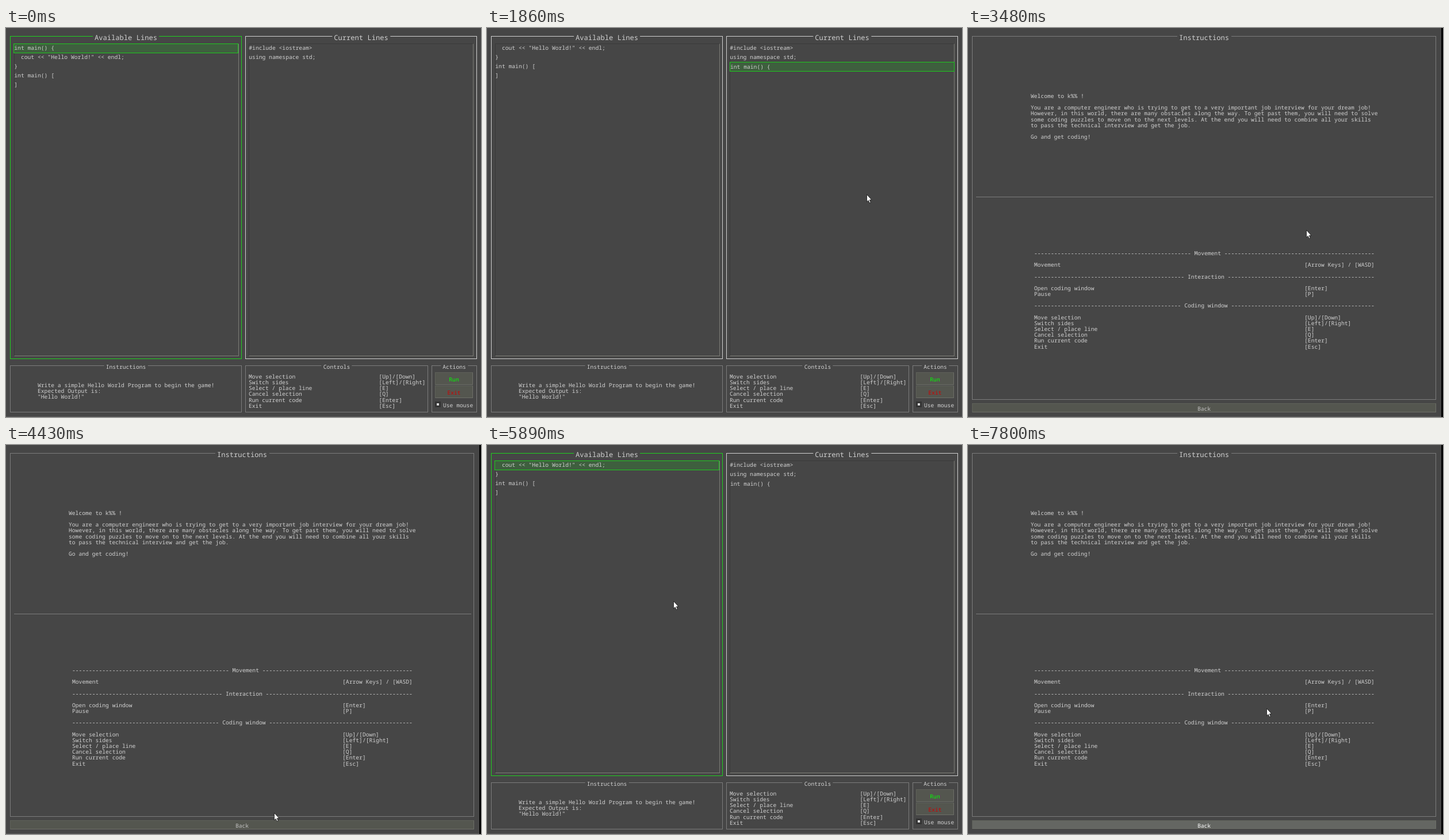
Recreate the animation shown at these times as an HTML page. Size 826 by 678 pixels, loop 8 s.

```html
<!DOCTYPE html>
<html lang="en">
<head>
<meta charset="utf-8">
<title>Coding window</title>
<style>
  html, body { margin: 0; width: 100%; height: 100%; overflow: hidden; background: #464646; }
  body {
    position: relative; color: #d0d0d0; white-space: pre;
    font: 9.68px/10.15px "Noto Sans Mono", "DejaVu Sans Mono", monospace;
    font-variant-ligatures: none; text-rendering: geometricPrecision;
  }
  div, svg { position: absolute; box-sizing: border-box; }
  .screen { left: 0; top: 0; width: 826px; height: 678px; background: #464646; overflow: hidden; }
  .base { left: 0; top: 677px; width: 826px; height: 1px; background: #5a5a5a; }

  .panel { border: 1px solid #7c7c7c; }
  .list { top: 14px; width: 403px; height: 563px; border-color: #d0d0d0; }
  .title {
    left: 50%; top: -4px; padding: 0 3.5px; line-height: 12px;
    transform: translateX(-50%); background: #464646;
  }
  .big { font-size: 12.1px; }
  .inset {
    top: 27px; width: 391px; height: 545px;
    border: 1px solid; border-color: #393939 #7c7c76 #7c7c76 #393939;
  }
  .rows { line-height: 16.1px; }
  .pick { width: 391px; height: 17px; background: #3e5f3e; border: 1px solid #1fc81f; }
  .button {
    text-align: center; background: #54564f;
    border: 1px solid; border-color: #5f615a #6d6f68 #6d6f68 #5f615a;
  }
  .action { left: 746px; width: 66px; height: 22px; line-height: 24px; }

  .anim { animation: 8s step-end infinite; }
  .moved { animation-name: moved; }
  #help { animation-name: help; }
  #left { animation-name: left; }
  #right { animation-name: right; }
  #before { animation-name: before; }
  #pickLeft { animation-name: pickLeft; }
  #placed { animation-name: placed; }
  #run { animation-name: run; }
  #back { animation-name: back; }
  #cursor { left: 0; top: 0; animation: move 8s infinite; }

  @keyframes help {
    0%, 60.5% { visibility: hidden; }
    43.5%, 97.5%, 100% { visibility: visible; }
  }
  @keyframes left {
    0%, 71.875% { border-color: #1fd01f; }
    15.625%, 78%, 100% { border-color: #d0d0d0; }
  }
  @keyframes right {
    0%, 71.875% { border-color: #d0d0d0; }
    24.125%, 78%, 100% { border-color: #1fd01f; }
  }
  @keyframes before { 0% { opacity: 1; } 15.625%, 100% { opacity: 0; } }
  @keyframes moved { 0% { opacity: 0; } 15.625%, 100% { opacity: 1; } }
  @keyframes pickLeft {
    0%, 71.875% { opacity: 1; }
    15.625%, 78%, 100% { opacity: 0; }
  }
  @keyframes placed {
    0%, 71.875% { background: transparent; border-color: transparent; }
    15.625%, 78%, 100% { background: #3e5f3e; border-color: #1fc81f; }
  }
  @keyframes run {
    0%, 85.625%, 100% { background: #54564f; text-indent: 0; line-height: 24px; }
    79.625% { background: #525252; text-indent: 1px; line-height: 25px; }
  }
  @keyframes back {
    0% { background: #54564f; color: #c4c4c4; height: 16px; }
    58% { background: #54564f; color: #fff; height: 16px; }
    97.5%, 100% { background: #646662; color: #fff; height: 15px; }
  }
  @keyframes move {
    0% { transform: translate(588px, 617px); opacity: 0; animation-timing-function: step-end; }
    .875% { transform: translate(588px, 617px); opacity: 1; animation-timing-function: steps(5); }
    5.25% { transform: translate(300px, 240px); animation-timing-function: steps(3); }
    7.875% { transform: translate(110px, 4px); animation-timing-function: steps(3); }
    10.375% { transform: translate(52px, 60px); animation-timing-function: step-end; }
    11.25% { transform: translate(110px, 70px); animation-timing-function: steps(2); }
    13% { transform: translate(193px, 44px); animation-timing-function: steps(3); }
    15.625% { transform: translate(150px, 34px); animation-timing-function: steps(3); }
    18.25% { transform: translate(480px, 140px); animation-timing-function: steps(3); }
    20.75% { transform: translate(640px, 300px); animation-timing-function: step-end; }
    23.25% { transform: translate(660px, 290px); animation-timing-function: steps(5); }
    27.625% { transform: translate(690px, 240px); animation-timing-function: steps(5); }
    32% { transform: translate(588px, 352px); animation-timing-function: step-end; }
    50.125% { transform: translate(586px, 358px); animation-timing-function: steps(6); }
    55.375% { transform: translate(466px, 641px); animation-timing-function: steps(4); }
    58.875% { transform: translate(432px, 659px); animation-timing-function: step-end; }
    60.5% { transform: translate(440px, 650px); animation-timing-function: steps(6); }
    65.75% { transform: translate(505px, 410px); animation-timing-function: steps(5); }
    70.125% { transform: translate(400px, 250px); animation-timing-function: step-end; }
    71% { transform: translate(360px, 230px); animation-timing-function: steps(5); }
    75.375% { transform: translate(300px, 300px); animation-timing-function: steps(3); }
    78% { transform: translate(620px, 480px); animation-timing-function: steps(3); }
    80.5% { transform: translate(756px, 606px); animation-timing-function: step-end; }
    81.375% { transform: translate(760px, 612px); animation-timing-function: steps(2); }
    83.875% { transform: translate(762px, 615px); animation-timing-function: step-end; }
    84.75% { transform: translate(740px, 580px); animation-timing-function: steps(3); }
    88.25% { transform: translate(232px, 62px); animation-timing-function: steps(3); }
    90.875%, 100% { transform: translate(519px, 459px); opacity: 1; animation-timing-function: step-end; }
  }
</style>
</head>
<body><div class="screen"
  ><div class="panel list anim" id="left" style="left:7px"><div class="title big">Available Lines</div></div
  ><div class="panel list anim" id="right" style="left:416px"><div class="title big">Current Lines</div></div
  ><div class="inset" style="left:14px"></div
  ><div class="inset" style="left:422px"></div
  ><div class="pick anim" id="pickLeft" style="left:13px;top:27px"></div
  ><div class="rows anim" id="before" style="left:14.3px;top:27px"></div
  ><div class="rows anim moved" id="after" style="left:14.3px;top:27px"></div
  ><div class="rows" id="current" style="left:422.3px;top:27px"></div
  ><div class="anim moved" style="left:422px;top:59px"><div class="pick anim" id="placed" style="left:0;top:0;line-height:15px">int main() {</div></div
  ><div class="panel" style="left:7px;top:588px;width:403px;height:82px"><div class="title">Instructions</div></div
  ><div class="panel" style="left:416px;top:588px;width:318px;height:82px"><div class="title">Controls</div></div
  ><div class="panel" style="left:740px;top:588px;width:79px;height:82px"><div class="title">Actions</div></div
  ><div id="task" style="left:55px;top:618px"></div
  ><div id="controls" style="left:422px;top:603px"></div
  ><div class="button action anim" id="run" style="top:600px;color:#0f0">Run</div
  ><div class="button action" style="top:623px;color:#d00000">Exit</div
  ><div style="left:746px;top:651px;width:10px;height:10px;background:#333"></div
  ><div style="left:749px;top:654px;width:4px;height:4px;background:#d8d8d8"></div
  ><div style="left:760px;top:652.5px">Use mouse</div
  ><div class="base"></div
></div><div class="screen anim" id="help"
  ><div class="panel" style="left:7px;top:14px;width:807px;height:634px"><div class="title big">Instructions</div></div
  ><div style="left:14px;top:294px;width:795px;height:1px;background:#7c7c7c"></div
  ><div id="story" style="left:109px;top:114px"></div
  ><div id="keys" style="left:115px;top:388px"></div
  ><div class="button anim" id="back" style="left:7px;top:654px;width:807px;line-height:17px">Back</div
  ><div class="base"></div
  ><div style="left:823px;top:0;width:3px;height:678px;background:#000"></div
></div><svg id="cursor" width="12" height="18"><path d="M.5 .3V13L3.2 10.4 5.2 15 7.2 14.1 5.3 9.7H9Z" fill="#fff" stroke="#000" stroke-width=".7"/></svg>
<script>
  const fill = (id, ...lines) => document.getElementById(id).textContent = lines.join('\n');
  const rule = (dashes, label) => `${'-'.repeat(dashes)} ${label} `.padEnd(102, '-');
  const table = (column, rows) => rows.map(([name, key]) => name.padEnd(column) + key);

  const bindings = [
    ['Move selection', '[Up]/[Down]'],
    ['Switch sides', '[Left]/[Right]'],
    ['Select / place line', '[E]'],
    ['Cancel selection', '[Q]'],
    ['Run current code', '[Enter]'],
    ['Exit', '[Esc]']
  ];
  const remaining = ['  cout << "Hello World!" << endl;', '}', 'int main() [', ']'];

  fill('before', 'int main() {', ...remaining);
  fill('after', ...remaining);
  fill('current', '#include <iostream>', 'using namespace std;');
  fill('task', 'Write a simple Hello World Program to begin the game!',
    'Expected Output is:', '"Hello World!"');
  fill('controls', ...table(39, bindings));
  fill('story', 'Welcome to k%% !', '',
    'You are a computer engineer who is trying to get to a very important job interview for your dream job!',
    'However, in this world, there are many obstacles along the way. To get past them, you will need to solve',
    'some coding puzzles to move on to the next levels. At the end you will need to combine all your skills',
    'to pass the technical interview and get the job.', '',
    'Go and get coding!');
  fill('keys', rule(47, 'Movement'), '',
    ...table(81, [['Movement', '[Arrow Keys] / [WASD]']]), '',
    rule(45, 'Interaction'), '',
    ...table(81, [['Open coding window', '[Enter]'], ['Pause', '[P]']]), '',
    rule(44, 'Coding window'), '',
    ...table(81, bindings));
</script>
</body>
</html>
```
